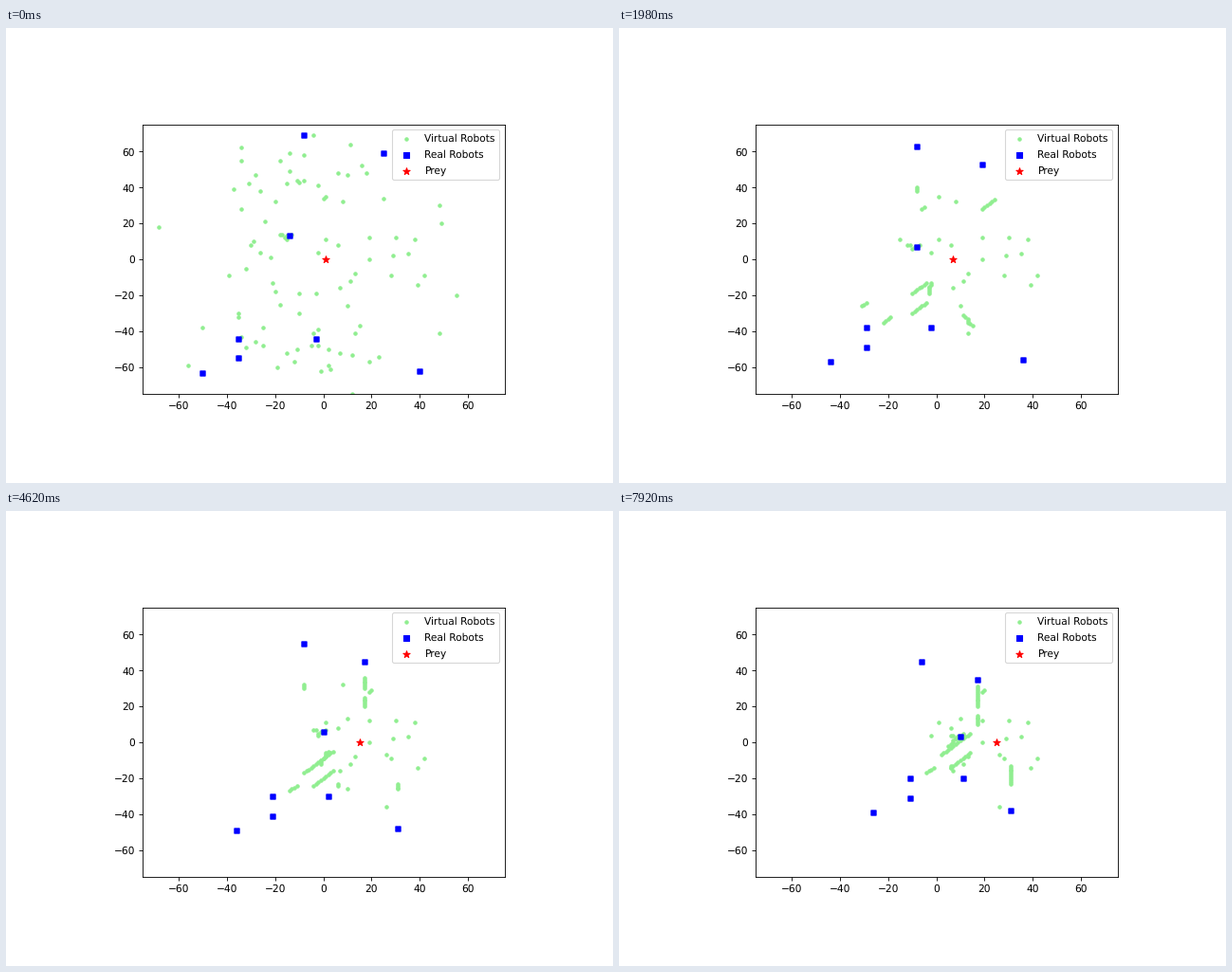
A matplotlib script that plays this animation: 640x480 px, repeating every 8 s.

```python
import math
import random

import numpy as np
import matplotlib.pyplot as plt
from matplotlib.animation import FuncAnimation

W, H, DPI = 640, 480, 100
STEP_MS, TICK_MS, LOOP_MS = 330, 40, 8000
LAST = 24
S = 0.77  # scale of the plot inside the stage

plt.rcParams.update({
    "font.family": "DejaVu Sans", "font.size": 10 * S,
    "text.hinting": "none",
    "axes.linewidth": 0.8 * S, "patch.linewidth": S,
    "lines.linewidth": 1.5 * S,
    "xtick.major.size": 3.5 * S, "ytick.major.size": 3.5 * S,
    "xtick.major.width": 0.8 * S, "ytick.major.width": 0.8 * S,
    "xtick.major.pad": 3.5 * S, "ytick.major.pad": 3.5 * S,
})


# Paths: displacement after n steps
def up_right(n):
    return n, n


def down(n):
    return 0, -n


def down_left(n):
    return -min(n, 8), -n


def bend_right(n):
    return round(float(np.interp(n, [3, 8, 14, 24], [0, 2, 5, 14]))), n


def bend_left(n):
    return float(np.interp(n, [0, 2, 4, 11], [0, -2, -2, -9])), n


# Real robots that follow one path: start and path
LEADERS = [
    (25, 59, down_left),
    (-35, -44, up_right),
    (-35, -55, up_right),
    (-3, -44, bend_right),
    (-50, -63, up_right),
    (40, -62, bend_left),
]

# Files of virtual robots that leave one spot a step apart:
# start, path, robots, steps before they show, last step
FILES = [
    (25, 34, down_left, 6, 0, LAST),
    (17, 44, down, 12, 8, LAST),
    (-8, 44, down, 3, 0, 15),
    (0, 34, down_left, 2, 0, 11),
    (-10, -30, up_right, 9, 0, LAST),
    (-10, -19, up_right, 13, 0, LAST),
    (-3, -19, bend_right, 8, 0, LAST),
    (-25, -38, up_right, 4, 0, LAST),
    (-35, -30, up_right, 3, 0, 9),
    (15, -37, bend_left, 7, 0, 10),
    (15, -37, bend_left, 2, 11, LAST),
    (40, -37, bend_left, 11, 11, LAST),
]

EDGE = [(-68, 18), (-56, -59), (55, -20), (-50, -38), (49, 20), (48, 30),
        (48, -41), (12, -75)]
WAITING = [(6, 8), (19, 12), (30, 12), (38, 11), (29, 2), (35, 3), (19, 0),
           (28, -9), (42, -9), (39, -14), (13, -8), (11, -12), (7, -16),
           (10, -26), (1, 11), (-2, 4), (8, 32), (1, 35), (13, -41),
           (-15, 11), (10, 47), (18, 48), (-20, 32), (-20, -18)]
ARRIVED = [(19, 28), (20, 29), (26, -7), (10, 13), (26, -36)]
TRAIL = [(-4, 1), (-3, 1), (-2, -1), (-1, 0), (1, 1)]
GOAL = (25, 0)


def scattered(count):
    rng = random.Random(4)
    points = []
    while len(points) < count:
        p = rng.randint(-39, 24), rng.randint(-63, 69)
        if math.dist(p, GOAL) > 47:
            points.append(p)
    return points


def leaves_at(p):
    # Those far from the goal set off first
    return max(2, 57 - 1.1 * math.dist(p, GOAL))


RESTING = WAITING + scattered(50)


def pathfinder(k):
    return -14 + k, max(6, 13 - k) - max(0, k - 21)


def real_robots(k):
    points = [(-8 + max(0, k - 22), 69 - k), pathfinder(k)]
    for x, y, path in LEADERS:
        dx, dy = path(k)
        points.append((x + dx, y + dy))
    return points


def virtual_robots(k):
    points = [p for p in RESTING if k <= leaves_at(p)]
    if k < 2:
        points += EDGE
    if k >= 8:
        points += ARRIVED
    for x, y, path, count, hidden, last in FILES:
        if k <= last:
            for n in range(max(hidden, k - count + 1), k + 1):
                dx, dy = path(n)
                points.append((x + dx, y + dy))
    x, y = pathfinder(k)
    return points + [(x + dx, y + dy) for dx, dy in TRAIL]


fig = plt.figure(figsize=(W / DPI, H / DPI), dpi=DPI, facecolor="white")
ax = fig.add_axes([143.6 / W, 93.6 / H, 496 * S / W, 369.6 * S / H])
ax.set_xlim(-75, 75)
ax.set_ylim(-75, 75)
ticks = range(-60, 61, 20)
ax.set_xticks(ticks)
ax.set_yticks(ticks)


def layer(points, size, color, marker, label):
    x, y = zip(*points)
    return ax.scatter(x, y, s=size * S * S, c=color, marker=marker,
                      label=label, snap=False)


virtual = layer(virtual_robots(0), 10, "lightgreen", "o", "Virtual Robots")
real = layer(real_robots(0), 24, "blue", "s", "Real Robots")
prey = layer([(1, 0)], 50, "red", "*", "Prey")
ax.legend(loc="upper right", labelspacing=0.58)


def update(i):
    k = min((i * TICK_MS + 30) // STEP_MS, LAST)
    virtual.set_offsets(virtual_robots(k))
    real.set_offsets(real_robots(k))
    prey.set_offsets([(1 + k, 0)])
    return virtual, real, prey


anim = FuncAnimation(fig, update, frames=LOOP_MS // TICK_MS, interval=TICK_MS,
                     repeat=True, repeat_delay=0, blit=False)
plt.show()
```
